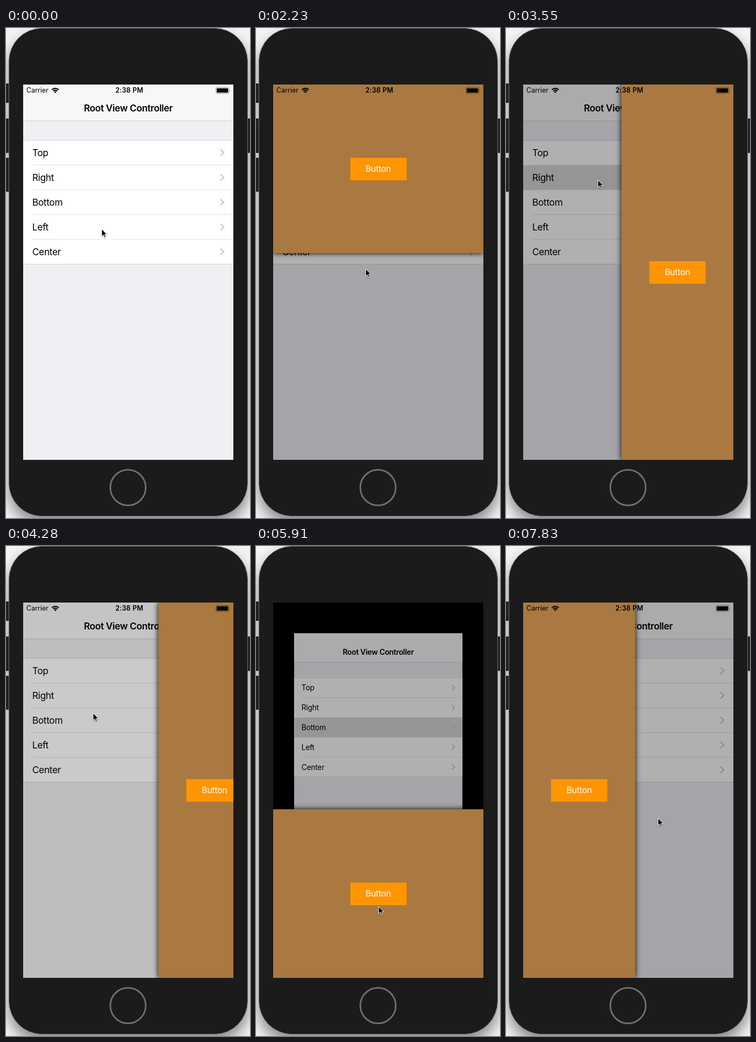
These frames come from a looping animation (455 px wide and 910 px high, 8000 ms). An HTML page:

```html
<!DOCTYPE html>
<html lang="en">
<head>
<meta charset="utf-8">
<title>Edge panes</title>
<style>
  html, body { margin: 0; width: 100%; height: 100%; overflow: hidden; }
  body { position: relative; background: #f4f4f4; font-family: Inter, Roboto, sans-serif; color: #000; }
  div, svg, span { position: absolute; box-sizing: border-box; white-space: nowrap; }
  .key { width: 8px; background: #2b2b2b; }
  #body { left: 5px; top: 0; width: 446px; height: 907px; border-radius: 62px; background: #1b1b1b;
    border: 1px solid #707070; box-shadow: 0 14px 26px rgba(0, 0, 0, .45); }
  #home { left: 193px; top: 819px; width: 69px; height: 69px; border-radius: 50%; border: 3px solid #6f6f6f; }
  #screen { left: 32px; top: 105px; width: 392px; height: 697px; background: #000; overflow: hidden; }
  #root { inset: 0; background: #efeff4; }
  #bar { left: 0; top: 0; width: 100%; height: 68px; background: #f7f7f7; border-bottom: 1px solid #d0d0d3; }
  #title { left: 0; width: 100%; top: 32px; line-height: 24px; text-align: center;
    font-size: 17.4px; font-weight: 600; letter-spacing: -.35px; }
  #list { left: 0; top: 103px; width: 100%; height: 231px; background: #fff;
    border: solid #d4d4d7; border-width: 1px 0; }
  .row { left: 0; width: 100%; height: 46px; line-height: 45px; padding-left: 17px;
    font-size: 17.4px; letter-spacing: -.35px; }
  .row + .row::before { content: ""; position: absolute; left: 17px; right: 0; top: -1px; height: 1px; background: #e2e2e4; }
  .row.on { background: #d9d9d9; top: auto; }
  .row svg { left: 366px; top: 15px; }
  #dim { inset: 0; background: #000; }
  .pane { background: #a97941; box-shadow: 0 0 10px #000; }
  .pane span { left: 50%; top: 50%; width: 105px; height: 42px; margin: -21px 0 0 -52.5px; background: #ff9500;
    color: #fff; text-align: center; line-height: 42px; font-size: 15.8px; letter-spacing: -.2px; }
  #status { left: 0; top: 0; width: 100%; height: 21px; line-height: 21px; font-size: 12.5px; }
  #cursor { left: 0; top: 0; overflow: visible; filter: drop-shadow(0 1px 1px rgba(0, 0, 0, .35)); }
</style>
</head>
<body>
<div class="key" style="left:-2px;top:103px;height:36px"></div>
<div class="key" style="left:-2px;top:168px;height:64px"></div>
<div class="key" style="left:-2px;top:241px;height:63px"></div>
<div class="key" style="left:449px;top:168px;height:64px"></div>
<div id="body"></div>
<div id="home"></div>
<div id="screen">
  <div id="root">
    <div id="bar"></div>
    <div id="title">Root View Controller</div>
    <div id="list"></div>
    <div id="dim"></div>
  </div>
  <div id="status">
    <span style="left:6px">Carrier</span>
    <svg style="left:52px;top:4px" width="16" height="14" fill="none" stroke="#000" stroke-width="2.2">
      <path d="M1.7 5.7A8.9 8.9 0 0 1 14.3 5.7M4.2 8.2A5.4 5.4 0 0 1 11.8 8.2"/>
      <path d="M8 12L5.8 9.8A3.1 3.1 0 0 1 10.2 9.8Z" fill="#000" stroke="none"/>
    </svg>
    <span style="left:172px;font-weight:600;letter-spacing:.2px">2:38 PM</span>
    <svg style="left:358px;top:4px" width="30" height="14">
      <rect x="1.5" y="1.5" width="24" height="11" rx="2" fill="none" stroke="#000" stroke-opacity=".45"/>
      <rect x="3" y="3" width="21" height="8" rx="1"/>
      <path d="M26.5 5.2Q28.4 7 26.5 8.8Z" fill-opacity=".5"/>
    </svg>
  </div>
</div>
<svg id="cursor" width="12" height="18">
  <path d="M.5 .5V14L3.7 11.1L5.9 16.2L8.1 15.2L6 10.3H10.2Z" stroke="#fff" stroke-width="1"/>
</svg>
<script>
const LOOP = 8000, STEP = 147.5, LAST = 53, SLIDE = 500, SHADE = .31;
const W = 392, H = 697, PW = 209, PH = 313;
const $ = id => document.getElementById(id);

// box: x, y, w, h; dir: side the pane hides on; press, open, close: times in ms
const panes = [
  { row: 0, box: [0, 0, W, PH], dir: [0, -1], press: 1180, open: 1246, close: 2267 },
  { row: 1, box: [W - PW, 0, PW, H], dir: [1, 0], press: 2940, open: 3050, close: 4074 },
  { row: 2, box: [0, H - PH, W, PH], dir: [0, 1], press: 5010, open: 5100, close: 6020, shrink: .2 },
  { row: 3, box: [0, 0, PW, H], dir: [-1, 0], press: 7070, open: 7192, close: 7810 }
];

// pointer stops: time, x, y
const stops = [
  [60, 179, 374], [735, 163, 232], [1180, 163, 232], [1475, 163, 236], [1650, 163, 236],
  [2100, 205, 448], [2290, 205, 448], [2655, 198, 304], [2900, 172, 283], [3600, 172, 283],
  [3900, 182, 336], [4080, 182, 336], [4277, 163, 311], [5450, 163, 311], [5900, 229, 670],
  [6050, 229, 656], [6200, 229, 656], [6900, 142, 383], [7400, 142, 383], [7817, 284, 506]
];

const rows = ["Top", "Right", "Bottom", "Left", "Center"].map((name, i) => {
  const row = document.createElement("div");
  row.className = "row";
  row.style.top = i * 46 + "px";
  row.innerHTML = name + '<svg width="12" height="16" fill="none" stroke="#c4c4c8" stroke-width="2">' +
    '<path d="M2 1.5L8 7.5L2 13.5"/></svg>';
  return $("list").appendChild(row);
});

for (const p of panes) {
  const [x, y, w, h] = p.box;
  p.el = document.createElement("div");
  p.el.className = "pane";
  p.el.style.cssText = `left:${x}px;top:${y}px;width:${w}px;height:${h}px`;
  p.el.innerHTML = "<span>Button</span>";
  $("screen").insertBefore(p.el, $("status"));
}

const clamp = v => Math.min(1, Math.max(0, v));
const ease = v => v < .5 ? 2 * v * v : 1 - 2 * (1 - v) ** 2;
const ramp = (t, start) => ease(clamp((t - start) / SLIDE));

function pointer(t) {
  const n = stops.findIndex(s => s[0] > t);
  if (n < 1) return (n ? stops[stops.length - 1] : stops[0]).slice(1);
  const [t0, x0, y0] = stops[n - 1], [t1, x1, y1] = stops[n];
  const k = ease((t - t0) / (t1 - t0));
  return [x0 + (x1 - x0) * k, y0 + (y1 - y0) * k];
}

function draw(t) {
  let shade = 0, shrink = 0;
  for (const p of panes) {
    const shown = ramp(t, p.open) - ramp(t, p.close);
    const hidden = 1 - shown;
    p.el.style.visibility = shown > .001 ? "visible" : "hidden";
    p.el.style.transform = `translate(${p.dir[0] * p.box[2] * hidden}px,${p.dir[1] * p.box[3] * hidden}px)`;
    rows[p.row].style.background = t >= p.press && t < p.close ? "#d9d9d9" : "none";
    shade += shown * SHADE;
    shrink += shown * (p.shrink || 0);
  }
  $("dim").style.opacity = shade;
  $("root").style.transform = shrink ? `translateY(${-63.5 * shrink}px) scale(${1 - shrink})` : "none";
  const [x, y] = pointer(t);
  $("cursor").style.transform = `translate(${Math.round(x) - 1}px,${Math.round(y) - 1}px)`;
}

function tick() {
  const t = performance.now() % LOOP;
  draw(Math.min(LAST, Math.floor(t / STEP)) * STEP);
  requestAnimationFrame(tick);
}
tick();
</script>
</body>
</html>
```
